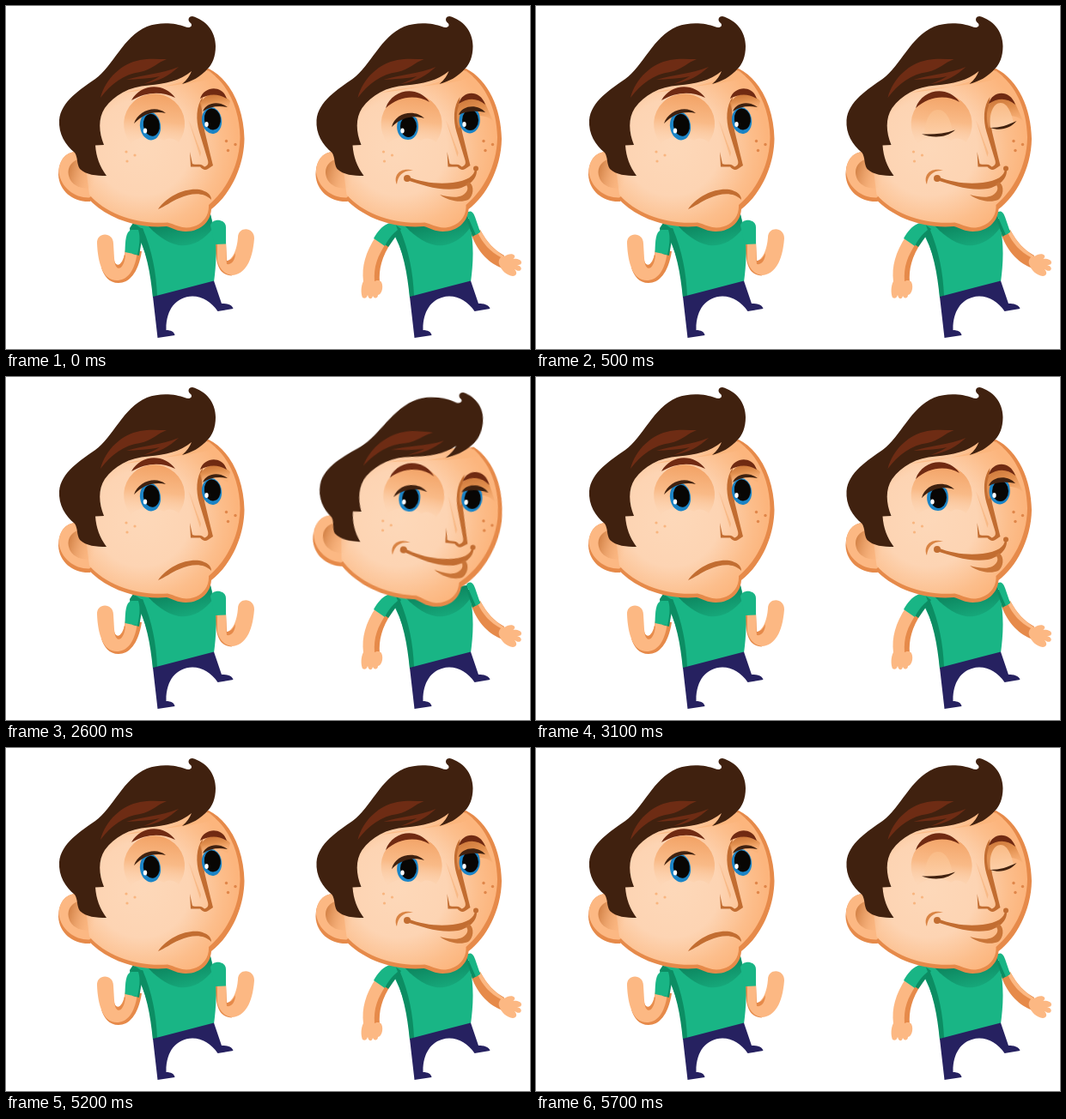
An HTML page for the animation above (5.8 s loop, 610 by 400 pixels).

```html
<!DOCTYPE html>
<html lang="en">
<head>
<meta charset="utf-8">
<title>Two moods</title>
<style>
  html, body { margin: 0; width: 100%; height: 100%; overflow: hidden; background: #fff; }
  svg { display: block; width: 610px; height: 400px; }
  .turn, .sway, .open, .closed { animation: 5.8s step-end infinite; }
  .turn { animation-name: turn; transform-origin: 460px 162px; }
  .sway { animation-name: sway; transform-origin: 516px 12px; }
  .open { animation-name: open; }
  .closed { animation-name: closed; }
  @keyframes turn {
    0%, 53.4483% { transform: none; }
    44.8276% { transform: rotate(6.2deg); }
  }
  /* The hair follows the head but flattens a little. */
  @keyframes sway {
    0%, 53.4483% { transform: none; }
    44.8276% { transform: matrix(.986, .068, -.115, .974, 16, 6); }
  }
  @keyframes open {
    0%, 10.3448%, 89.6552% { visibility: visible; }
    8.6207%, 87.931%, 98.2759%, 100% { visibility: hidden; }
  }
  @keyframes closed {
    0%, 10.3448%, 89.6552% { visibility: hidden; }
    8.6207%, 87.931%, 98.2759%, 100% { visibility: visible; }
  }
  .skin { fill: #fcb883; }
  .rim { fill: #e68a4a; }
  .line { fill: #c26d31; }
  .hair { fill: #40210f; }
  .brow { fill: #702a12; }
  .shirt { fill: #19b585; }
  .fold { fill: #0c8d63; }
  .iris { fill: #1b84c6; }
  .pupil { fill: #080604; }
  .glint { fill: #fff; }
</style>
</head>
<body>
<svg viewBox="0 0 610 400">
  <defs>
    <radialGradient id="face" gradientUnits="userSpaceOnUse" cx="158" cy="165" r="112">
      <stop offset="0" stop-color="#fdd8b9"/>
      <stop offset=".5" stop-color="#fdd4b3"/>
      <stop offset=".82" stop-color="#fcbe8c"/>
      <stop offset="1" stop-color="#fcb57d"/>
    </radialGradient>
    <linearGradient id="socket" gradientUnits="userSpaceOnUse" x1="176" y1="102" x2="170" y2="160">
      <stop offset="0" stop-color="#f2a265"/>
      <stop offset=".55" stop-color="#f9ba87"/>
      <stop offset="1" stop-color="#fdd2ae" stop-opacity=".2"/>
    </linearGradient>
    <linearGradient id="farSocket" x1="0" y1="0" x2=".3" y2="1">
      <stop offset="0" stop-color="#c46f33"/>
      <stop offset=".5" stop-color="#e2904f"/>
      <stop offset="1" stop-color="#f5ab70" stop-opacity=".3"/>
    </linearGradient>
    <linearGradient id="lid" x1="0" y1="0" x2="0" y2="1">
      <stop offset="0" stop-color="#f9bb86"/>
      <stop offset="1" stop-color="#fdcfa8"/>
    </linearGradient>
    <linearGradient id="ear" x1="0" y1=".3" x2="1" y2=".6">
      <stop offset="0" stop-color="#d17f43"/>
      <stop offset="1" stop-color="#fcb883" stop-opacity="0"/>
    </linearGradient>
    <linearGradient id="neck" gradientUnits="userSpaceOnUse" x1="205" y1="250" x2="212" y2="281">
      <stop offset="0" stop-color="#0d8760"/>
      <stop offset="1" stop-color="#17aa7c"/>
    </linearGradient>

    <g id="torso">
      <path class="shirt" d="M150 252 L238 243 C247 272 245 300 242 322 L171 340 C170 310 163 284 150 262Z"/>
      <path d="M163 254 L238 243 L241 259 C230 274 215 281 201 279 C186 276 173 265 163 254Z" fill="url(#neck)"/>
      <path class="fold" d="M150 260 C164 285 168 312 171 340 L176 338 C175 311 170 285 159 259Z"/>
      <path d="M171 339 L242 320.500 L251 347 C257 347 263 348 264.500 353 L246.500 356 C239 345 229 338.500 217 338.500 C198 339 186 354 186.500 378 C192 378 196 380 196.500 384 L176.500 387Z" fill="#262160"/>
    </g>

    <g id="head">
      <path class="rim" d="M84 170 C69 169 61 181 61 197 C62 216 78 229 98 228 L112 205Z"/>
      <path class="rim" d="M104 100 L236 73 C262 86 277 120 277.500 155 C277 190 259 222 239 237 C238 252 226 263 209 263 C200 263 194 259 187 257 C150 260 115 246 95 224 L90 180Z"/>
      <path class="skin" d="M84 170 C69 169 61 181 61.500 194 C64 212 80 224 97 223.500 L120 205Z"/>
      <path d="M104 100 L230 73 C257 86 272 119 272.500 153 C272 188 255 216 236 232 C237 248 224 258.500 210 258.500 C201 258 195 254 188 252.500 C151 255 116 242 97 220 L92 180Z" fill="url(#face)"/>
      <path d="M137 101 C176 97 216 88 236 75 L244 82 C216 94 174 92 137 101Z" fill="#fbb47b" opacity=".75"/>
      <path d="M88 178 C74 180 69 192 75 203 C80 211 90 214 101 212 L105 195Z" fill="url(#ear)"/>

      <path d="M145 160 A35.500 35.500 0 1 1 201 159 C196 154 188 153 184 157 C173 151 157 150 145 160Z" fill="url(#socket)"/>
      <path d="M212 133 L229 182 L236 176 L224 147Z" fill="#fdcba2" opacity=".55"/>
      <path d="M213 134 L226 176 L227 171Z" fill="#f3a869" opacity=".5"/>
      <path class="line" d="M229 106 C221 117 221 133 225 147 L235 180 C236 184 235 186 231 187.500 C227 183 222 186 217 184 L214 170 L215 187.500 L226 187.500 C229 191 232 192 235 190 L241 186 L238 174 L231.500 147 C229 132 227 119 229 106Z"/>
      <g fill="#f8b57f">
        <circle cx="140" cy="170" r="1.600"/><circle cx="150" cy="174" r="1.600"/><circle cx="141" cy="181" r="1.600"/>
      </g>
      <g fill="#e08649">
        <circle cx="256.500" cy="157.500" r="1.700"/><circle cx="267" cy="161.500" r="1.700"/><circle cx="258.500" cy="168.500" r="1.700"/>
      </g>
    </g>

    <g id="hair">
      <path class="hair" d="M117 198 C105 198 93 197 86 190 C82 184 84 177 80 171 C69 162 61 149 62 133 C64 111 87 97 104 85 C125 70 136 36 164 24 C179 18 198 20 208 24 C214 27 218 23 215 20 C211 17 212 12 217 12 C232 16 244 29 244 47 C244 59 240 68 235 73 C226 83 216 88 205 91 C211 86 214 81 216 76 C203 87 185 91 166 92.500 C143 94 126 104 115 119 C107 131 108 147 114 162 L104 162.500 C105 176 109 187 117 198Z"/>
      <g fill="#6e2c14">
        <path d="M110 107 C116 84 135 67 156 63 C166 61 177 62 187 62 C176 66 170 74 156 77 C138 79 122 91 110 107Z"/>
        <path d="M140 86 C160 80 181 79 201 71 C190 81 178 88 160 91 C168 88 174 85 179 82 C166 85 152 85 140 86Z"/>
      </g>
    </g>
  </defs>

  <!-- Gloomy figure -->
  <g>
    <path class="rim" d="M125 292 C126 306 136 306 139 284 L158 286 C154 312 143 323 131 323 C120 323 114 315 111 305Z"/>
    <path class="skin" d="M106 277 C105 263 125 263 125 277 L126 294 C127 308 136 308 139 284 L153 286 C150 311 140 320 129 320 C113 320 107 300 106 277Z"/>
    <path class="rim" d="M126 295 C127 307 136 305 138 290 L139 291 C137 309 127 311 126 295Z"/>
    <path class="rim" d="M244 275 L256 275 L257 298 L263 314.500 C251 314 243 306 244 275Z"/>
    <path class="skin" d="M270 270 C270 257 289 257 289 271 C287 298 278 313 263 314 C255 313 248 307 246 296 L246 276 L256 276 L257 298 C264 295 269 284 270 270Z"/>
    <path class="rim" d="M256 290 L257 297 C261 297 265 293 267 288 C267 297 262 302 257 301Z"/>
    <use href="#torso"/>
    <path class="fold" d="M144 259 L148 253 L160 261 L155 291 L147 289Z"/>
    <path class="shirt" d="M138.500 287 C139 274 139 263 146 261 L154 261 C157 270 155 281 153 290Z"/>
    <path class="shirt" d="M238 256 C240 247 256 248 256 258 L256 277.500 L243 278Z"/>
    <use href="#head"/>

    <path class="brow" d="M146 110 C157 90 184 89 197 107 C181 99 163 100 146 110Z"/>
    <path d="M226 113 C234 100 251 99 261 111 L258 123 C248 116 236 115 228 122Z" fill="url(#farSocket)"/>
    <path class="brow" d="M226 108 C231 93 252 92 257 108 C247 102 237 102 226 108Z"/>
    <g transform="rotate(-8 168 140)">
      <ellipse class="iris" cx="168" cy="140" rx="12" ry="16.500"/>
      <ellipse class="pupil" cx="169.500" cy="139" rx="9.500" ry="13"/>
    </g>
    <ellipse class="glint" cx="162" cy="145.500" rx="2.200" ry="3"/>
    <path class="hair" d="M149 137 C154 122 174 115 186 125 C174 122 160 125 149 137Z"/>
    <g transform="rotate(-8 240 133)">
      <ellipse class="iris" cx="239.500" cy="133.500" rx="11.500" ry="15.500"/>
      <ellipse class="pupil" cx="240.500" cy="132" rx="9.500" ry="12.500"/>
    </g>
    <ellipse class="glint" cx="233.500" cy="138" rx="2.200" ry="3"/>
    <path class="hair" d="M229 123 C233 112 248 110 258 118 C247 116 238 117 229 123Z"/>
    <path class="line" d="M177 237 C188 221 209 212 225 214 C234 216 239 220 239 226 C230 217 216 218 202 224 C192 228 185 234 177 237Z"/>
    <use href="#hair"/>
  </g>

  <!-- Cheerful figure -->
  <g>
    <path class="rim" d="M434 270 L449 275 C437 293 434 307 435 322 L422 322Z"/>
    <path class="skin" d="M431 268 C418 288 414 304 416 321 C413 327 413 335 415 340 C418 342 420 340 421 337 C422 342 426 343 427 338 C429 342 433 341 433 337 C437 337 440 328 437 322 C435 319 431 320 429 321 C428 304 432 292 443 276Z"/>
    <path class="rim" d="M541 265 L552 261 C560 276 569 285 580 291 L578 306 C563 300 550 289 541 265Z"/>
    <path class="skin" d="M549 264 L552 261 C560 276 569 285 580 292 C584 289 590 288 592 291 C593 293 591 295 589 295 C595 294 600 296 600 299 C600 302 597 302 595 302 C599 303 601 306 599 308 C597 310 594 308 592 307 C596 311 594 315 590 315 C583 314 577 309 574 301 C573 298 574 295 576 293 C564 287 555 277 549 264Z"/>
    <use href="#torso" x="299"/>
    <path class="fold" d="M441 278 L445 281 L460 260 L452 254Z"/>
    <path class="shirt" d="M428 271 C434 260 443 251 453 253 L456 261 C450 266 444 273 441 280Z"/>
    <path class="fold" d="M536 247 L545 250 L552 263.500 L543 269Z"/>
    <path class="shirt" d="M536 242 C540 237 544 240 546 246 L552 263.500 L547 267Z"/>

    <g class="turn">
      <use href="#head" x="299.500"/>
      <path d="M528 114 C533 101 550 102 558 114 L567 134 C556 124 538 126 527 143 C524 133 524 122 528 114Z" fill="url(#farSocket)"/>
      <path class="brow" d="M442 119 C449 98 478 91 493 112 C477 103 458 105 442 119Z"/>
      <path class="brow" d="M527 114 C531 98 552 97 558 115 C548 107 538 107 527 114Z"/>

      <g class="open">
        <path class="iris" d="M456 135 C461 127 473 126 478 131 C483 143 478 156 468 156 C458 156 453 145 456 135Z"/>
        <ellipse class="pupil" cx="468.500" cy="140.500" rx="9.500" ry="12.500"/>
        <ellipse class="glint" cx="461.500" cy="145.500" rx="2.200" ry="3"/>
        <path class="hair" d="M449 141 C453 124 476 120 487 131 C474 127 460 130 449 141Z"/>
        <path class="iris" d="M529 126 C535 119 547 119 550 124 C555 136 549 148 540 148.500 C530 148 525 136 529 126Z"/>
        <ellipse class="pupil" cx="540.500" cy="133" rx="9.500" ry="12"/>
        <ellipse class="glint" cx="533.500" cy="138" rx="2.200" ry="3"/>
        <path class="hair" d="M527 127 C531 115 550 114 558 124 C547 122 537 122 527 127Z"/>
      </g>
      <g class="closed">
        <path d="M452 150 C453 134 458 121 468 121 C478 121 483 134 485 147 C475 153 463 153 452 150Z" fill="url(#lid)"/>
        <path class="hair" d="M449 149.500 C463 150 476 149 488 144.500 C478 154 462 154 449 149.500Z"/>
        <path d="M529 142 C527 126 532 113 541 113 C549 113 554 126 556 137 C547 143 538 144 529 142Z" fill="url(#lid)"/>
        <path class="hair" d="M529 142 C540 142 549 139 559.500 134 C552 143 540 146 529 142Z"/>
      </g>

      <path d="M455 208 C450 197 460 187 474 192 C463 191 456 197 455 208Z" fill="#d98444"/>
      <circle class="line" cx="467" cy="201" r="4"/>
      <circle class="line" cx="547" cy="189.500" r="3"/>
      <path class="line" d="M467 199 C485 206 503 208 520 206 C537 204 546 198 546 189 L548 190 C549 202 539 210 526 213 C505 216 485 209 467 203Z"/>
      <path d="M539 205 C546 210 544 222 538 226 C529 230 514 227 505 220 C516 223 525 224 531 221 C538 217 539 211 535 208Z" fill="#c97538"/>
    </g>
    <g class="sway"><use href="#hair" x="299.500"/></g>
  </g>
</svg>
</body>
</html>
```
